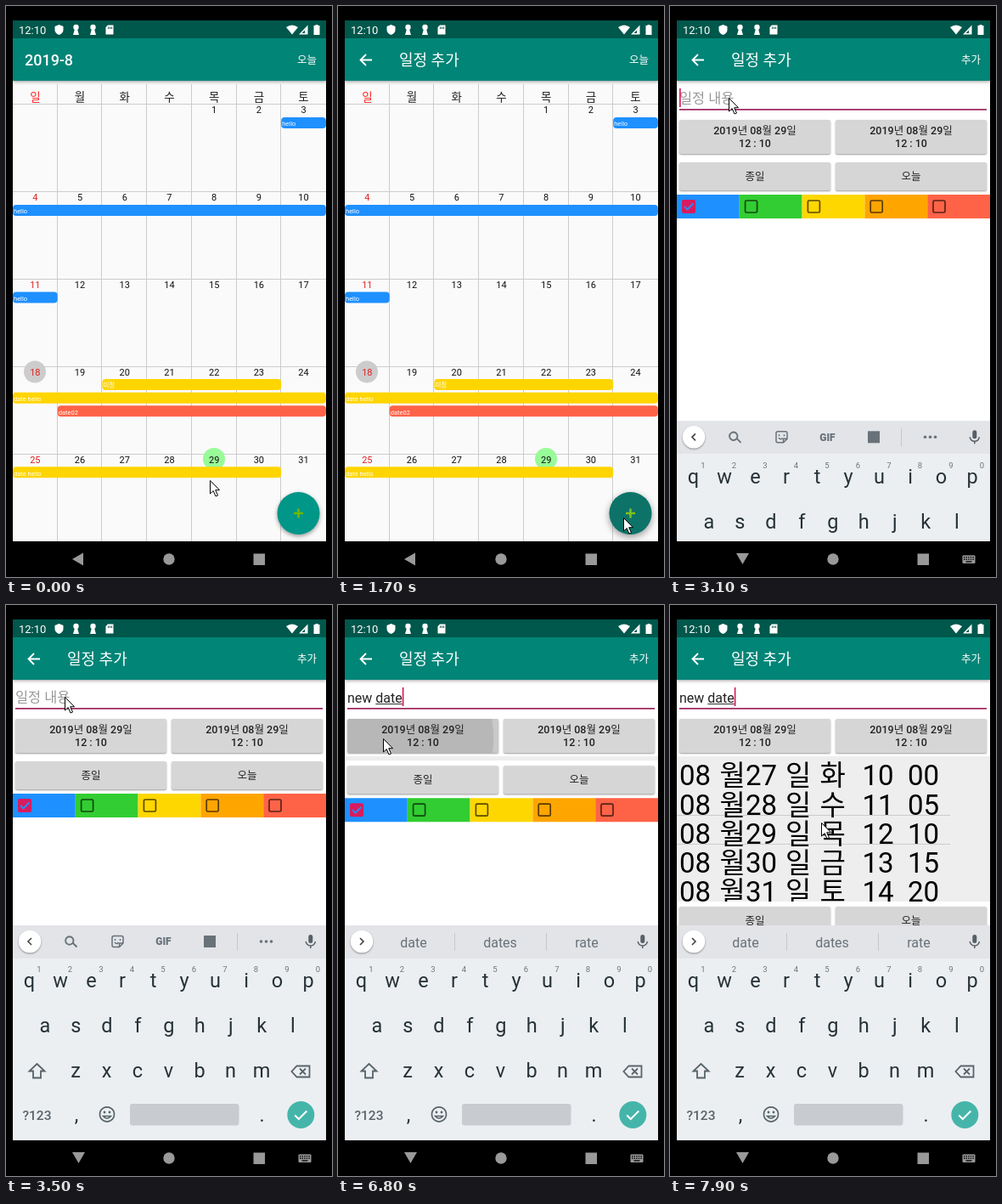
An HTML page with a canvas for the animation above (8 s loop, 384 by 672 pixels).

```html
<!DOCTYPE html>
<html lang="ko">
<head>
<meta charset="utf-8">
<title>일정</title>
<style>
html, body { margin: 0; width: 100%; height: 100%; overflow: hidden; background: #000; }
canvas { display: block; width: 384px; height: 672px; }
</style>
</head>
<body>
<canvas width="384" height="672"></canvas>
<script>
const c = document.querySelector('canvas').getContext('2d');
const FONT = 'Roboto, "Noto Sans CJK KR", "Noto Sans CJK", sans-serif';
const LOOP = 8000;
const BLUE = '#1e90ff', GOLD = '#ffd500', TOMATO = '#ff6347', ACCENT = '#d81b60';
const LABEL_COLORS = [BLUE, '#32cd32', '#ffd700', '#ffa500', TOMATO];
const COL = 52.7, ROW = 102.9;

// [time, x, y] of the mouse pointer tip
const POINTER = [[0, 240, 558], [50, 240, 558], [600, 335, 587], [750, 335, 587], [1100, 336, 602],
  [1950, 336, 602], [2300, 78, 138], [2600, 69, 108], [6250, 69, 108], [6600, 53, 157],
  [7250, 53, 157], [7800, 178, 256], [LOOP, 178, 256]];

// [time, text, suggestions]
const TYPING = [
  [2900, '', null],
  [3700, 'n', ['no', 'not', 'now']],
  [3950, 'ne', ['ne', 'new', 'now']],
  [4250, 'new', ['new', 'news', 'now']],
  [4550, 'new ', ['one', 'year', 'and']],
  [4850, 'new d', ['d', 'day', 'do']],
  [5200, 'new da', ['da', 'day', 'date']],
  [5450, 'new dat', ['day', 'date', 'data']],
  [5700, 'new date', ['date', 'dates', 'rate']]];

const ramp = (t, from, to) => Math.min(1, Math.max(0, (t - from) / (to - from)));
const smooth = (t, from, to) => (1 - Math.cos(Math.PI * ramp(t, from, to))) / 2;

function rect(x, y, w, h, color, r = 0) {
  c.fillStyle = color;
  c.beginPath();
  c.roundRect(x, y, w, h, r);
  c.fill();
}
function disc(x, y, r, color) {
  c.fillStyle = color;
  c.beginPath();
  c.arc(x, y, r, 0, 7);
  c.fill();
}
function trace(d, x, y) {
  const p = new Path2D();
  p.addPath(new Path2D(d), new DOMMatrix([1, 0, 0, 1, x, y]));
  return p;
}
function fill(d, x, y, color) {
  c.fillStyle = color;
  c.fill(trace(d, x, y), 'evenodd');
}
function stroke(d, x, y, color, width = 1.6) {
  c.strokeStyle = color;
  c.lineWidth = width;
  c.stroke(trace(d, x, y));
}
// y is the middle of the capital letters
function text(s, x, y, size, color, align = 'center', weight = 400) {
  c.font = `${weight} ${size}px ${FONT}`;
  c.textAlign = align;
  c.fillStyle = color;
  c.fillText(s, x, y + size * 0.36);
}
function shadowed(blur, dy, draw) {
  c.save();
  c.shadowColor = 'rgba(0,0,0,.4)';
  c.shadowBlur = blur;
  c.shadowOffsetY = dy;
  draw();
  c.restore();
}

function statusBar() {
  rect(8, 17, 369, 21, '#00574b');
  text('12:10', 15, 28, 13, '#fff', 'left');
  fill('M0-6L5-4V0Q5 4 0 6Q-5 4-5 0V-4Z', 62.5, 28, '#fff');
  for (const x of [82.5, 102.5]) {
    disc(x, 25, 3.2, '#fff');
    fill('M-1.5-1H1.5L3.5 6H-3.5Z', x, 28, '#fff');
  }
  fill('M-2-5.5H4.5V5.5H-4.5V-3ZM-2-3.5V-1H-1V-3.5ZM0-3.5V-1H1V-3.5ZM2-3.5V-1H3V-3.5Z', 122, 28, '#fff');
  fill('M0 5.5L-7-3Q0-8 7-3Z', 337, 28, '#fff');
  fill('M5-5.5V5.5H-5.5ZM3.5-1.5L-2 4H1.5V0Z', 350.5, 28, '#fff');
  fill('M-1.5-6H1.5V-5H3.5V6H-3.5V-5H-1.5Z', 366, 28, '#fff');
}

function toolbar(t) {
  shadowed(4, 1, () => rect(8, 38, 369, 50, '#008577'));
  if (t < 1500) text('2019-8', 22, 64, 18, '#fff', 'left', 500);
  else {
    stroke('M7 0H-6M0-6.5L-6.5 0L0 6.5', 33, 63.5, '#fff', 1.8);
    text('일정 추가', 72, 63.5, 18, '#fff', 'left');
  }
  text(t < 1800 ? '오늘' : '추가', 354.5, 63, 12.5, '#fff');
}

function event(day, days, y, color, label) {
  rect(8 + day * COL, y, days * COL, 13, color, 4);
  text(label, 9 + day * COL, y + 7.5, 7.5, '#fff', 'left');
}

function calendar(t) {
  rect(8, 88, 369, 542, '#fafafa');
  for (let i = 1; i < 7; i++) rect(Math.round(8 + i * COL) - 1, 92, 1, 538, '#ccc');
  for (let i = 0; i < 5; i++) rect(8, Math.round(115 + i * ROW), 369, 1, '#ccc');
  disc(34, 430.5, 13, '#ccc');
  disc(245, 533, 13, '#98fb98');
  [...'일월화수목금토'].forEach((s, i) =>
    text(s, 8 + (i + 0.5) * COL, 107, 13.5, i ? '#222' : '#f22'));
  for (let d = 1; d <= 31; d++) {
    const cell = d + 3, col = cell % 7;
    text(d, 8 + (col + 0.5) * COL, 122.3 + Math.floor(cell / 7) * ROW, 11, col ? '#111' : '#d22');
  }
  event(6, 1, 131, BLUE, 'hello');
  event(0, 7, 234, BLUE, 'hello');
  event(0, 1, 336.5, BLUE, 'hello');
  event(2, 4, 439, GOLD, '미정');
  event(0, 7, 454.7, GOLD, 'date hello');
  event(1, 6, 470.3, TOMATO, 'date02');
  event(0, 6, 542.3, GOLD, 'date hello');

  const press = ramp(t, 1250, 1500);
  shadowed(5 + 3 * press, 2 + press, () => disc(344.5, 597, 25, '#009688'));
  if (press) {
    c.save();
    c.clip();
    disc(344.5, 597, 8 + 18 * press, 'rgba(38,50,45,.35)');
    c.restore();
  }
  stroke('M-5.5 0H5.5M0-5.5V5.5', 344.5, 597, press ? '#7fc21c' : '#70b800', 2.5);
}

function button(x, y, w, h, lines, color = '#222') {
  shadowed(2, 1, () => rect(x, y, w, h, '#d6d6d6', 2));
  lines.forEach((s, i) =>
    text(s, x + w / 2, y + h / 2 + (i - (lines.length - 1) / 2) * 15.5, 12.5, color, 'center', color === '#222' ? 500 : 400));
}

function buttonRipple(t) {
  if (t < 6650 || t > 7300) return;
  c.save();
  c.beginPath();
  c.roundRect(11, 134, 178, 40, 2);
  c.clip();
  c.globalAlpha = 1 - ramp(t, 7000, 7300);
  rect(11, 134, 178, 40, 'rgba(0,0,0,.06)');
  disc(53, 157, 150 * ramp(t, 6630, 6827), 'rgba(0,0,0,.09)');
  c.restore();
}

function picker(h) {
  c.save();
  c.beginPath();
  c.rect(8, 178, 369, h);
  c.clip();
  rect(8, 178, 369, h, '#eee');
  if (h > 12) {
    const middle = 269 - (171 - h) / 2;
    for (const y of [-22, 12]) rect(8, middle + y, 322, 1, '#ccc');
    for (let i = -2; i <= 2; i++) {
      const cells = [['08', 11], ['월', 58.5], [29 + i, 89], ['일', 136], ['화수목금토'[i + 2], 176.5],
        [12 + i, 226.5], [String(10 + 5 * i).padStart(2, '0'), 280]];
      for (const [s, x] of cells) text(s, x, middle + i * 34.2, 33, '#000', 'left');
    }
  }
  c.restore();
}

function input(t, state) {
  const focus = ramp(t, 2900, 3100);
  rect(11, 121, 362, 1, '#888');
  if (focus) rect(192 - 181 * focus, 121, 362 * focus, 1.7, '#a02a62');
  const value = state ? state[1] : '';
  if (!value) text('일정 내용', 11, 108, 16.4, '#999', 'left');
  text(value, 11, 109, 16, '#222', 'left');
  const end = 11 + c.measureText(value).width;
  const word = value.split(' ').pop();
  const width = c.measureText(word).width;
  if (word) rect(end - width, 116, width, 1, '#333');
  if (state && Math.floor((t - state[0]) / 500) % 2 === 0) rect(end, 97, 1.7, 22, ACCENT);
}

function form(t, state) {
  rect(8, 88, 369, 542, '#fff');
  input(t, state);
  const date = ['2019년 08월 29일', '12 : 10'];
  button(11, 134, 178, 40, []);
  buttonRipple(t);
  date.forEach((s, i) => text(s, 100, 146.3 + i * 15.5, 12.5, '#222', 'center', 500));
  button(195, 134, 178, 40, date);
  const h = 171 * smooth(t, 6745, 7250);
  if (h) picker(h);
  button(11, 184 + h, 178, 33, ['종일']);
  button(195, 184 + h, 178, 33, ['오늘']);
  LABEL_COLORS.forEach((color, i) => {
    const x = 8 + i * 73.8, y = 222 + h;
    rect(x, y, 73.8, 28, color);
    if (i) {
      c.strokeStyle = 'rgba(0,0,0,.65)';
      c.lineWidth = 1.7;
      c.beginPath();
      c.roundRect(x + 6.8, y + 7, 14, 14, 1.5);
      c.stroke();
    } else {
      rect(x + 6, y + 6, 16, 16, ACCENT, 2);
      stroke('M-5 0L-1.5 3.5L5.5-3.5', x + 14, y + 14, color, 1.8);
    }
  });
  if (t < 3000) button(11, 404, 362, 32, ['일정 제거'], '#a6a6a6');
}

function strip(suggestions) {
  const gray = '#687278';
  rect(8, 377, 369, 39, '#e2e4e8');
  shadowed(2, 1, () => disc(28, 396, 13.3, '#fff'));
  stroke(suggestions ? 'M-2-4L2 0L-2 4' : 'M2-4L-2 0L2 4', 28, 396, '#444');
  if (suggestions) {
    suggestions.forEach((s, i) => text(s, 89 + i * 102, 397, 16, gray));
    for (const x of [137, 245]) rect(x, 386, 1, 21, '#c4c8cc');
  } else {
    stroke('M3 0A4.7 4.7 0 1 1 3-.1M1.5 2L7 7.5', 76.5, 395, gray, 1.9);
    stroke('M-4.5-6.5H4.5Q6.5-6.5 6.5-4.5V2L2 6.5H-4.5Q-6.5 6.5-6.5 4.5V-4.5Q-6.5-6.5-4.5-6.5ZM2 6.5V2H6.5M-3.5 1Q-1 4 1 1M-3-3V-1M3-3V-1', 131.5, 396, gray, 1.5);
    text('GIF', 185.5, 396, 12, gray, 'center', 900);
    rect(233, 389, 14, 14, gray);
    rect(272, 386, 1, 21, '#c4c8cc');
    for (const x of [300.5, 306.5, 312.5]) disc(x, 396, 1.8, gray);
  }
  rect(356.3, 388, 5, 10, '#555f65', 2.5);
  stroke('M-5.5 0A5.5 5 0 0 0 5.5 0M0 5V8', 358.8, 396, '#555f65', 1.5);
}

function keyboard(t, suggestions) {
  const up = ramp(t, 3000, 3300);
  if (!up) return;
  c.save();
  c.beginPath();
  c.rect(8, 88, 369, 542);
  c.clip();
  c.translate(0, 253 * (1 - up) ** 2);
  const ink = '#263238', gray = '#57636a';
  rect(8, 416, 369, 214, '#eceff1');
  strip(suggestions);
  [['qwertyuiop', 27.5, 442], ['asdfghjkl', 45.8, 495], ['zxcvbnm', 82, 548]].forEach(([keys, x, y]) =>
    [...keys].forEach((key, i) => text(key, x + i * 36.5, y, 23.5, ink)));
  [...'1234567890'].forEach((n, i) => text(n, 39 + i * 36.5, 429, 9.5, '#6b757a'));
  stroke('M0-8.5L9 0H4.5V8H-4.5V0H-9Z', 36.5, 548.5, gray, 1.8);
  stroke('M-4.5-6.5H10.5V6.5H-4.5L-10.5 0ZM-1-3.5L6 3.5M6-3.5L-1 3.5', 347, 549, gray, 1.8);
  text('?123', 36.5, 600, 15.5, gray, 'center', 500);
  text(',', 83, 600, 23, ink);
  text('.', 301.5, 600, 23, ink);
  stroke('M8.5 0A8.5 8.5 0 1 1 8.5-.1M-4.5 2Q0 7.5 4.5 2Z', 119, 599.5, gray, 1.7);
  disc(116, 597, 1.4, gray);
  disc(122, 597, 1.4, gray);
  rect(146, 587, 128.5, 25.5, '#c8ccd0', 3);
  disc(347.3, 600, 16, '#45b5aa');
  stroke('M-7 0L-2.5 4.5L7-5', 347.3, 600.5, '#fff', 2);
  c.restore();
}

function navigation(t) {
  const gray = '#999';
  rect(0, 630, 384, 42, '#000');
  disc(192, 651, 6.7, gray);
  rect(291.5, 644.5, 13.5, 13.5, gray);
  if (t < 3000) return fill('M-6.5 0L6.5-7.5V7.5Z', 84.5, 651, gray);
  fill('M-7.5-6.5H7.5L0 6.5Z', 85.5, 650.5, gray);
  rect(344.5, 646.5, 15, 9.5, gray, 1);
  for (let i = 0; i < 5; i++)
    for (const y of [648, 650.5]) rect(346 + i * 2.6, y, 1.4, 1.4, '#000');
  rect(348.5, 653.3, 7, 1.3, '#000');
}

function pointer(t) {
  const i = POINTER.findIndex(p => p[0] > t);
  const [t0, x0, y0] = POINTER[i - 1], [t1, x1, y1] = POINTER[i];
  const k = smooth(t, t0, t1);
  const shape = 'M.5.5V16L4.2 12.6L7 19L9.5 18L6.7 11.7H11.5Z';
  const x = x0 + (x1 - x0) * k, y = y0 + (y1 - y0) * k;
  fill(shape, x, y, '#fff');
  stroke(shape, x, y, '#000', 1);
}

function draw(t) {
  const state = TYPING.filter(s => s[0] <= t).pop();
  rect(0, 0, 384, 672, '#000');
  if (t < 1800) calendar(t);
  else form(t, state);
  toolbar(t);
  statusBar();
  keyboard(t, state && state[2]);
  navigation(t);
  pointer(t);
}

const start = performance.now();
function tick() {
  draw((performance.now() - start) % LOOP);
  requestAnimationFrame(tick);
}
tick();
</script>
</body>
</html>
```
